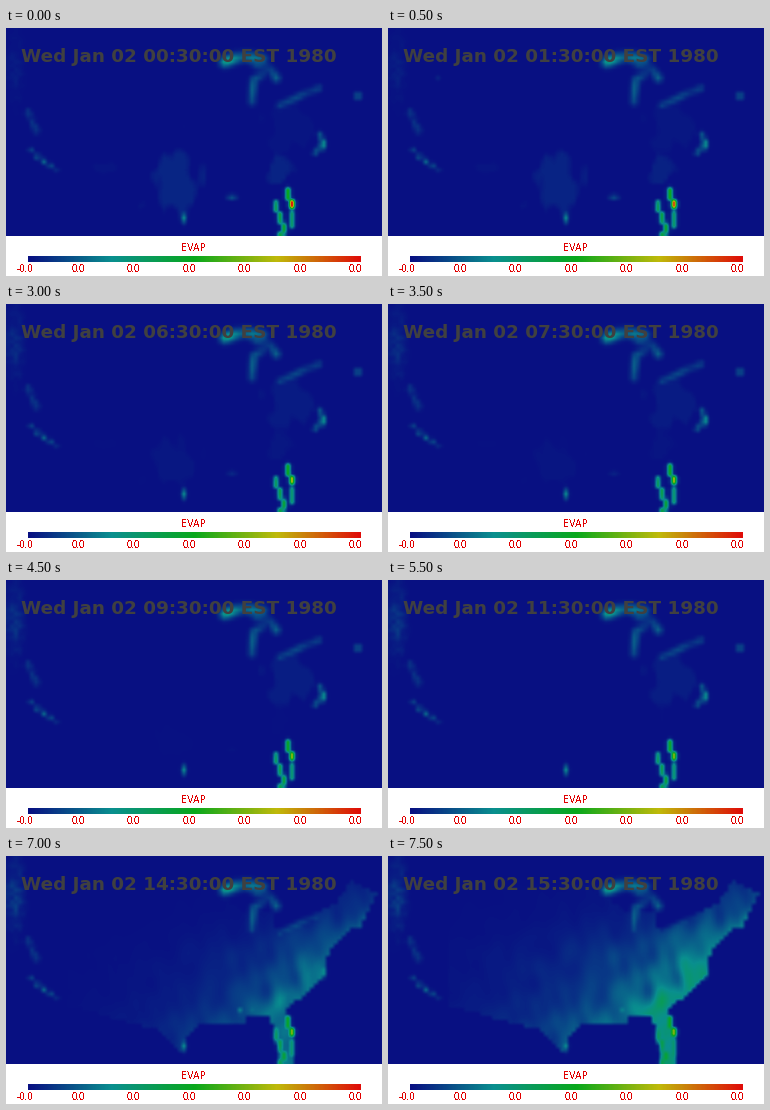
These frames come from a looping animation (376x248 px, 8000 ms). A matplotlib script:

```python
import numpy as np
import matplotlib.pyplot as plt
from matplotlib.animation import FuncAnimation
from matplotlib.colors import LinearSegmentedColormap
from matplotlib.path import Path

W, H, MAP_H, CELL = 376, 248, 208, 4
HOURS, STEP = 16, 500
RED = "#e00000"

cmap = LinearSegmentedColormap.from_list("evap", [
    (0, "#081082"), (0.25, "#0a8f8f"), (0.5, "#08a81c"),
    (0.75, "#c0ba0a"), (1, "#e00c08")])

X, Y = np.meshgrid(np.arange(CELL / 2, W, CELL), np.arange(CELL / 2, MAP_H, CELL))
GRAIN = np.random.default_rng(3).random(X.shape)


def smooth_noise(seed, scale):
    rng = np.random.default_rng(seed)
    total = np.zeros(X.shape)
    for _ in range(14):
        a, ph = rng.uniform(0, 2 * np.pi, 2)
        k = 2 * np.pi / (scale * rng.uniform(.6, 1.8))
        total += np.sin(k * (X * np.cos(a) + Y * np.sin(a)) + ph)
    return total / np.sqrt(7)


FINE, BROAD = smooth_noise(4, 20), smooth_noise(9, 48)


def merge(*fields):
    return np.maximum.reduce(fields)


def ramp(v):
    v = np.clip(v, 0, 1)
    return v * v * (3 - 2 * v)


def fade(hour, start, end, a, b):
    return a + (b - a) * np.clip((hour - start) / (end - start), 0, 1)


def bump(x, y, rx, ry):
    return np.exp(-((X - x) / rx) ** 2 / 2 - ((Y - y) / ry) ** 2 / 2)


def stroke(points, width):
    """Soft line through the points."""
    near = np.full(X.shape, np.inf)
    for (x0, y0), (x1, y1) in zip(points, points[1:]):
        dx, dy = x1 - x0, y1 - y0
        s = np.clip(((X - x0) * dx + (Y - y0) * dy) / (dx * dx + dy * dy), 0, 1)
        near = np.minimum(near, np.hypot(X - x0 - s * dx, Y - y0 - s * dy))
    return np.exp(-(near / width) ** 2 / 2)


def column(x, top, bottom):
    return stroke([(x, top), (x, bottom)], 1.7)


def patch(x, y, rx, ry):
    return np.clip((bump(x, y, rx, ry) + .13 * FINE - .45) * 4, 0, 1)


# Land that warms up: Gulf coast, Florida, Atlantic coast, northern border
LAND = Path([
    (60, 150), (150, 174), (176, 197), (180, 184), (192, 168), (238, 168),
    (244, 158), (262, 160), (268, 172), (272, 206), (288, 206), (287, 174),
    (280, 154), (320, 120), (318, 104), (340, 76), (356, 70), (372, 38),
    (346, 24), (330, 46), (272, 80), (266, 54), (240, 56), (200, 28),
    (60, 30)]).contains_points(np.c_[X.ravel(), Y.ravel()]).reshape(X.shape)

# Lines of constant distance from the south-east shore run at 45 degrees
INLAND = np.clip((420 - X - Y) / np.sqrt(2), 0, None)
SOUTH = .45 + .55 * ramp((Y - 35) / 70)
MOTTLE = 1 + .12 * FINE + .1 * BROAD

LAKES = (1 + .2 * FINE) * merge(
    .21 * stroke([(218, 34), (237, 28), (256, 32)], 3.8),
    .13 * stroke([(250, 36), (264, 42), (270, 50)], 3.2),
    .10 * stroke([(258, 46), (248, 52), (246, 74)], 3),
    .10 * stroke([(274, 77), (290, 70), (312, 60)], 2.6))

ATLANTIC = merge(
    .18 * bump(352, 68, 2.5, 2.5),
    .32 * bump(317, 116, 2, 3.5),
    .14 * stroke([(314, 106), (317, 116), (309, 125)], 2))

SIERRA = (.4 + .6 * GRAIN) * .09 * stroke([(22, 84), (31, 104)], 2.6)
PACIFIC = merge(*[
    .19 * np.sin(np.pi * (.2 + .7 * s)) * bump(25 + 26 * s, 122 + 20 * s ** .8, 2, 2)
    for s in np.linspace(0, 1, 5)])

STEADY = merge(LAKES, ATLANTIC, SIERRA, PACIFIC, .25 * bump(178, 190, 1.7, 3.5))

# Three stepped strips down the west side, two on the east
FLORIDA = merge(
    .55 * column(282, 162, 170), .36 * column(286, 184, 198),
    *[(.4 + .05 * n) * column(270 + 4 * n, 175 + 11 * n, 182 + 11 * n)
      for n in range(3)],
    .45 * column(274, 206, 210))
HOT = column(286, 174, 179)

PLAINS = patch(100, 140, 11, 6)
EAST = patch(272, 142, 15, 12)
PIEDMONT = patch(285, 100, 22, 22)
NORTHWEST = (.3 + .7 * GRAIN) * bump(9, 40, 6, 24)
GULF_DOT = bump(226, 169, 3.5, 1.8)
INLAND_DOT = bump(50, 50, 2, 2)
BAYS = merge(bump(234, 155, 2.5, 2.5), .8 * bump(246, 155, 2.5, 2.5))


def daylight(hour):
    sun = max(hour - 12, 0)
    warm = .088 * sun * np.exp(-INLAND / (22 + 11 * sun))
    return LAND * SOUTH * MOTTLE * warm


def evap(hour):
    night = fade(hour, 0, 10, 1, 0)
    centre = patch(171 - .5 * hour, 156 + .5 * hour, 20, 15 + 14 * night)
    faint = merge(
        .045 * night * centre, .015 * night * PLAINS, .04 * night * EAST,
        fade(hour, 0, 9, .015, .03) * PIEDMONT,
        fade(hour, 0, 13, .04, .12) * NORTHWEST)
    dots = merge(
        .15 * night * GULF_DOT,
        .13 * max(1 - abs(hour - 3) / 3, 0) * INLAND_DOT,
        fade(hour, 13, 14, 0, .24) * BAYS)
    strips = merge(fade(hour, 0, 15, 1, .9) * FLORIDA,
                   (.7 + .4 * np.exp(-hour / 4)) * HOT)
    return merge(STEADY, faint, dots, strips, daylight(hour))


fig = plt.figure(figsize=(W / 100, H / 100), dpi=100, facecolor="white")


def panel(x, y, w, h):
    ax = fig.add_axes([x / W, 1 - (y + h) / H, w / W, h / H])
    ax.axis("off")
    return ax


def label(x, y, text, px, **kw):
    return fig.text(x / W, 1 - y / H, text, fontsize=px * .72, va="baseline", **kw)


field_img = panel(0, 0, W, MAP_H).imshow(
    evap(0), cmap=cmap, vmin=0, vmax=1, interpolation="bilinear",
    extent=(0, W, MAP_H, 0), aspect="auto")
panel(22, 228, 333, 6).imshow(
    np.linspace(0, 1, 333)[None], cmap=cmap, aspect="auto")

title = label(15.5, 34.4, "", 18.35, family="DejaVu Sans", weight="bold",
              color="#404040")
small = dict(color=RED, ha="center", antialiased=False)
label(187.8, 223, "EVAP", 9.7, family="DejaVu Sans", **small)
label(19, 244, "-0.0", 9.6, family="Liberation Sans", **small)
for n in range(1, 7):
    label(17 + 55.4 * n, 244, "0.0", 9.6, family="Liberation Sans", **small)


def update(hour):
    field_img.set_data(evap(hour))
    title.set_text(f"Wed Jan 02 {hour:02d}:30:00 EST 1980")
    return field_img, title


anim = FuncAnimation(fig, update, frames=HOURS, interval=STEP,
                     repeat=True, repeat_delay=0, blit=False)
plt.show()
```
